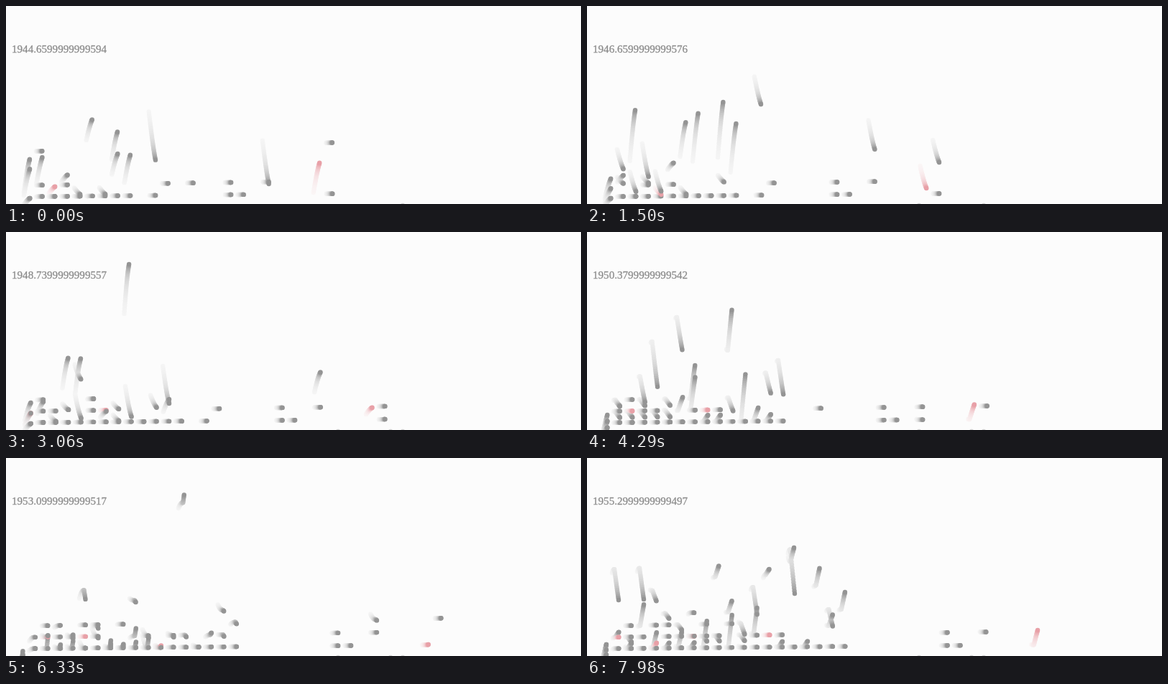
Write an HTML page with a canvas that moves like this. It is 800 by 276 pixels and loops after 8000 ms.

```html
<!DOCTYPE html>
<html lang="en">
<head>
<meta charset="utf-8">
<title>Years</title>
<style>
  html, body { margin: 0; width: 100%; height: 100%; overflow: hidden; background: #fcfcfc; }
  canvas, svg { position: absolute; left: 0; top: 0; display: block; }
  text {
    font: 15.1px "Liberation Serif", "Times New Roman", serif;
    fill: #8c8c8c; stroke: #8c8c8c; stroke-width: 0.3px;
  }
</style>
</head>
<body>
<canvas id="stage" width="800" height="276"></canvas>
<svg width="800" height="276"><text id="year" x="8" y="65"></text></svg>
<script>
const LOOP = 8000, STEP = 30, FIRST = 1944, LAST = 1955;
const TRAIL = 24, FADE = 0.895;
const BACK = [252, 252, 252], GREY = [148, 148, 148], PINK = [232, 160, 167];

// Repeatable random number from 0 to 1
function rand(a, b, c) {
  const n = Math.sin(a * 12.9898 + b * 78.233 + c * 37.719) * 43758.5453;
  return n - Math.floor(n);
}

// Each person has a level for the start of every year; newcomers rise from 0.
const people = [];
function add(born, level, pink = false, until = Infinity) {
  people.push({ born, pink, until, level: y => y > born ? level(y) : 0 });
}
const steady = (born, level, until, pink) => add(born, () => level, pink, until);
const wander = (born, levels, pink, until) => add(born, y => levels[y - FIRST], pink, until);

// Those who stand out, one level per year
wander(1920, [5, 5, 6, 3, 2, 2, 2, 2, 3, 3, 3], false, 1954);
wander(1921, [0, 4, 4, 1, 1, 2, 1, 3, 1, 1, 1.2, 1, 3.4], true);
wander(1925, [7, 1, 8, 4, 2, 5, 1, 1, 5.4, 3, 2.5, 2, 2]);
wander(1934, [10, 3, 12, 8, 1], false, 1948);
wander(1937, [3, 7, 2, 10, 8, 2, 5, 2, 6.6, 4, 3.4, 2.7, 4.6]);
wander(1940, [1, 1, 2, 1, 7, 15, 7, 13, 10.4, 13, 17, 8, 10.5]);
wander(1944, [0, 4, 2, 9.6, 7, 4.5, 10, 5, 6, 5, 4, 1], false, 1955);

// Elders who keep their place
steady(1920, 1, 1949);
steady(1925, 2, 1954);
steady(1927, 1);
steady(1928, 1);
steady(1928, 2);
steady(1931, 2, 1946);
steady(1933, 2, 1952);
steady(1934, 1, 1949);

// The crowd: filled low rows that slip now and then, and climbers above them
for (let born = 1936; born <= LAST; born++) {
  const rows = born > 1944 ? 3 : born > 1940 ? 2 : 1;
  for (let row = 1; row <= rows; row++) {
    if (row > 1 && rand(born, row, 1) < 0.2) continue;
    const slips = y => row > 1 && y > born + 1 && rand(born, row, y) < 0.2;
    add(born, y => row - slips(y), row === 2 && born % 3 === 1);
  }
  const climbers = born > 1942 ? 2 : 1;
  for (let c = 0; c < climbers; c++)
    add(born, y => 1 + Math.round(8 * rand(born, c + 5, y) ** 3));
}

const counts = [1944.6599999999594];
while (counts.length <= LOOP / STEP) counts.push(counts[counts.length - 1] + 0.02 + 0.02);

const shade = (c, k) => `rgb(${c.map((v, i) => Math.round(BACK[i] + (v - BACK[i]) * k))})`;
const fades = c => Array.from({ length: TRAIL + 1 }, (_, i) => shade(c, FADE ** i));
const greys = fades(GREY), pinks = fades(PINK);

const ctx = document.getElementById("stage").getContext("2d");
const label = document.getElementById("year");

function dot(x, y, fill) {
  ctx.fillStyle = fill;
  ctx.beginPath();
  ctx.arc(x, y, 3.2, 0, 2 * Math.PI);
  ctx.fill();
}

function place(p, y, part) {
  const from = p.level(y), to = p.level(y + 1);
  const level = from + (to - from) * Math.sin(part * Math.PI / 2);
  const age = y + part - p.born;
  return [
    21.7 + 17.5 * age + 0.42 * Math.max(0, age - 22) - 0.017 * level * level,
    281.5 - 0.08 * age - level * (15.7 + 0.085 * age)
  ];
}

function draw(step) {
  ctx.fillStyle = shade(BACK, 1);
  ctx.fillRect(0, 0, 800, 276);
  // Faint remains at the bottom edge
  [552, 462, 535].forEach((x, i) => { if (step >= 45 * i) dot(x, 278, "#d2d2d2"); });
  for (let i = TRAIL; i >= 0; i--) {
    const time = 194466 + 4 * step - 2 * i;
    const y = Math.floor(time / 100), part = time % 100 / 100;
    for (const p of people)
      if (y >= p.born && y < p.until) dot(...place(p, y, part), (p.pink ? pinks : greys)[i]);
  }
  label.textContent = counts[step];
}

let shown = -1;
const start = performance.now();
function tick() {
  const step = Math.floor((performance.now() - start) % LOOP / STEP);
  if (step !== shown) draw(shown = step);
  requestAnimationFrame(tick);
}
tick();
</script>
</body>
</html>
```
